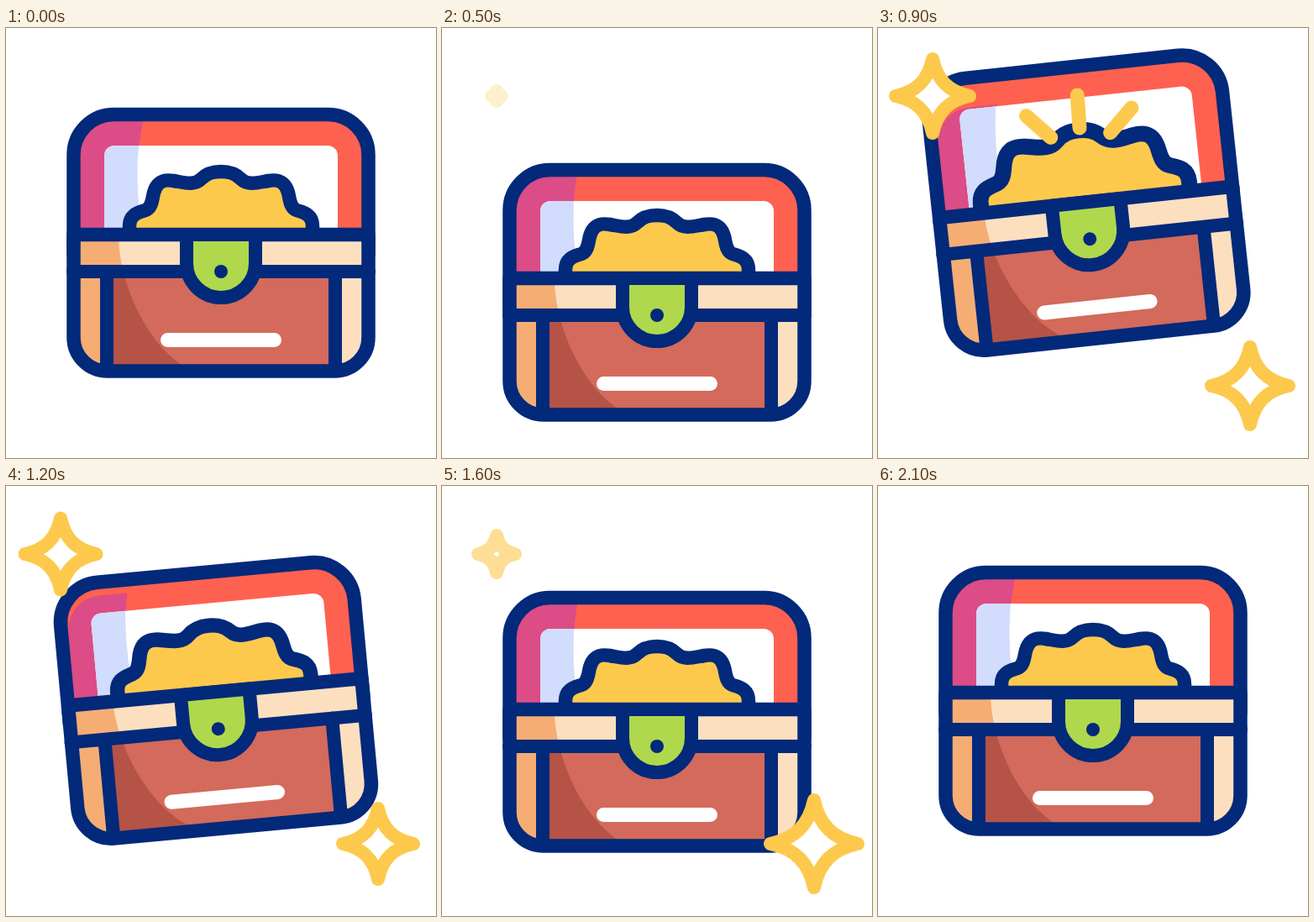
An HTML page with a canvas that plays this animation: 512x512 px, repeating every 2200 ms.

```html
<!DOCTYPE html>
<html lang="en">
<head>
<meta charset="utf-8">
<title>Treasure chest</title>
<style>
  html, body { margin: 0; width: 100%; height: 100%; overflow: hidden; background: #fff; }
  canvas { display: block; width: 100vmin; height: 100vmin; }
</style>
</head>
<body>
<canvas id="stage" width="512" height="512"></canvas>
<script>
const ctx = document.getElementById('stage').getContext('2d');
const LOOP = 2200, STEP = 100;
const NAVY = '#02297a', GOLD = '#fdc94d', CREAM = '#fcdfbf';

const shape = {
  lid: 'M80.5 270V151a48 48 0 0 1 48-48H383.5a48 48 0 0 1 48 48V270',
  panel: 'M117 270V152a12 12 0 0 1 12-12H383a12 12 0 0 1 12 12V270Z',
  lidShade: 'M89 290V151a40 40 0 0 1 40-40H163Q150 175 163 247V290Z',
  panelShade: 'M100 290V60H170L163 103Q150 175 163 247V290Z',
  gold: 'M147 247V236C147 222 157 220 166 217C174 214 174 204 176 196C180 182 188 180 200 182' +
        'C212 184 224 188 232 180C240 172 248 171 256 171C264 171 272 172 280 180' +
        'C288 188 300 184 312 182C324 180 332 182 336 196C338 204 338 214 346 217C355 220 365 222 365 236V247',
  body: 'M80.5 246H431.5V368.5a40 40 0 0 1-40 40H120.5a40 40 0 0 1-40-40Z',
  bodyShade: 'M70 246H134C134 300 165 375 214 404V420H70Z',
  bars: 'M80 290H432M120 290V408M392 290V408',
  clasp: 'M215 246V280a41 41 0 0 0 82 0V246Z'
};
for (const name in shape) shape[name] = new Path2D(shape[name]);

// Keys are [time, value] pairs
const tracks = {
  y: [[0, 0], [100, 3], [300, 26], [500, 52], [600, 38], [700, 5], [900, -39],
      [1200, -1], [1400, 23], [1600, 20], [1900, 4], [2100, 0]],
  lid: [[0, 0], [300, 7], [500, 14], [700, -1], [900, -19], [1200, 0],
        [1400, 9], [1600, 10], [1900, 2], [2100, 0]],
  tilt: [[500, 0], [600, 1.2], [700, 3.7], [900, 6.1], [1200, 5.3], [1400, 2], [1600, 0]],
  gold: [[500, 1], [700, 1.06], [900, 1.145], [1200, 1.06], [1500, 1]],
  star: [[400, 0], [500, 14], [600, 38], [700, 54], [800, 61], [900, 52], [1000, 50],
         [1200, 50.5], [1400, 60], [1500, 63], [1600, 30], [1700, 0]],
  rayTip: [[600, 0], [700, 10], [800, 36], [900, 46], [1000, 50], [1100, 52]],
  rayTail: [[700, 0], [800, 1], [900, 7], [1000, 26], [1100, 52]]
};

// Smooth interpolation that never overshoots its keys
function at(keys, t) {
  const last = keys.length - 1;
  if (t <= keys[0][0]) return keys[0][1];
  if (t >= keys[last][0]) return keys[last][1];
  const i = keys.findIndex(k => k[0] > t) - 1;
  const slope = n => {
    if (n <= 0 || n >= last) return 0;
    const [a, b, c] = [keys[n - 1], keys[n], keys[n + 1]];
    return (b[1] - a[1]) * (c[1] - b[1]) <= 0 ? 0 : (c[1] - a[1]) / (c[0] - a[0]);
  };
  const [t0, v0] = keys[i], [t1, v1] = keys[i + 1];
  const h = t1 - t0, s = (t - t0) / h, e = s * s * (3 - 2 * s);
  return v0 + (v1 - v0) * e + h * s * (1 - s) * ((1 - s) * slope(i) - s * slope(i + 1));
}

function fill(path, color) {
  ctx.fillStyle = color;
  ctx.fill(path);
}

function stroke(path, color = NAVY, width = 16.5) {
  ctx.strokeStyle = color;
  ctx.lineWidth = width;
  ctx.stroke(path);
}

function line(x0, y0, x1, y1, color, width) {
  const path = new Path2D();
  path.moveTo(x0, y0);
  path.lineTo(x1, y1);
  stroke(path, color, width);
}

function group(draw) {
  ctx.save();
  draw();
  ctx.restore();
}

function drawLid(drop, shadeDrop) {
  const shade = (clip, path, color) => group(() => {
    ctx.clip(clip);
    ctx.translate(0, shadeDrop - drop);
    fill(path, color);
  });
  group(() => {
    ctx.translate(0, drop);
    fill(shape.lid, '#ff6150');
    shade(shape.lid, shape.lidShade, '#dc4c87');
    fill(shape.panel, '#fff');
    shade(shape.panel, shape.panelShade, '#d2dcfd');
    stroke(shape.lid);
  });
}

function drawGold(scale) {
  group(() => {
    ctx.translate(256, 247);
    ctx.scale(scale, scale);
    ctx.translate(-256, -247);
    fill(shape.gold, GOLD);
    stroke(shape.gold);
  });
}

function drawBody() {
  group(() => {
    ctx.clip(shape.body);
    fill(shape.body, CREAM);
    fill(shape.bodyShade, '#f5ad74');
    ctx.beginPath();
    ctx.rect(120, 290, 272, 119);
    ctx.clip();
    fill(shape.body, '#d36a5b');
    fill(shape.bodyShade, '#b55347');
  });
  stroke(shape.body);
  stroke(shape.bars, NAVY, 16);
  fill(shape.clasp, '#b0d84c');
  stroke(shape.clasp, NAVY, 16);
  const hole = new Path2D();
  hole.arc(256, 290, 8, 0, 7);
  fill(hole, NAVY);
  line(192.5, 371.5, 319.5, 371.5, '#fff', 17);
}

function drawRays(t) {
  const tip = at(tracks.rayTip, t), tail = at(tracks.rayTail, t);
  if (tip - tail < 1) return;
  for (const [x, y, dx, dy] of [[211, 135, -.75, -.66], [240.5, 126, -.07, -1], [272, 130, .65, -.76]])
    line(x + dx * tail, y + dy * tail, x + dx * tip, y + dy * tip, GOLD, 17);
}

function drawStar(x, y, t) {
  const radius = at(tracks.star, t), r = radius - 8;
  if (r <= 0) return;
  const near = r * .12, far = r * .43;
  group(() => {
    ctx.translate(x, y);
    ctx.globalAlpha = Math.min(1, radius / 50);
    const path = new Path2D();
    path.moveTo(0, -r);
    path.bezierCurveTo(near, -far, far, -near, r, 0);
    path.bezierCurveTo(far, near, near, far, 0, r);
    path.bezierCurveTo(-near, far, -far, near, -r, 0);
    path.bezierCurveTo(-far, -near, -near, -far, 0, -r);
    path.closePath();
    fill(path, '#fff');
    stroke(path, GOLD, 16);
  });
}

function draw(t) {
  ctx.fillStyle = '#fff';
  ctx.fillRect(0, 0, 512, 512);
  ctx.lineCap = ctx.lineJoin = 'round';
  const tilt = at(tracks.tilt, t);
  group(() => {
    ctx.translate(256, 325 + at(tracks.y, t));
    ctx.rotate(-tilt * Math.PI / 180);
    ctx.translate(-256, -325);
    drawLid(at(tracks.lid, t), Math.min(8, tilt * 4));
    drawGold(at(tracks.gold, t));
    drawBody();
  });
  drawRays(t);
  drawStar(65, 81, t);
  drawStar(443, 426, t - 200);
}

const start = performance.now();
function tick() {
  const t = (performance.now() - start) % LOOP;
  draw(Math.floor(t / STEP) * STEP);
  requestAnimationFrame(tick);
}
tick();
</script>
</body>
</html>
```
